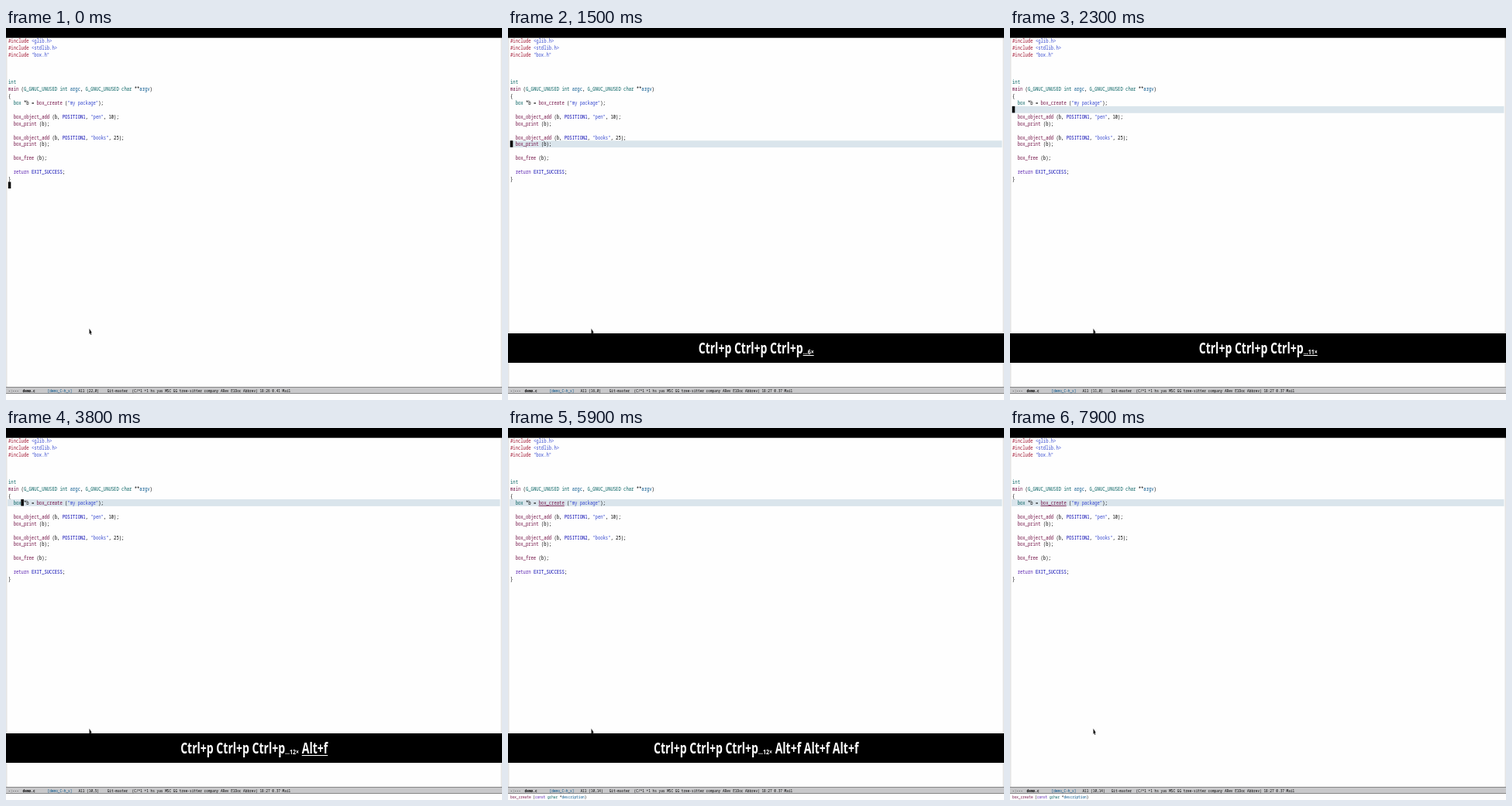
Animation of 640x480 px, one loop 8 s. Source, as an HTML page with a canvas:

```html
<!DOCTYPE html>
<html lang="en">
<head>
<meta charset="utf-8">
<title>Editor demo</title>
<style>
  html, body { margin: 0; width: 100%; height: 100%; overflow: hidden; background: #000; }
  canvas { display: block; }
</style>
</head>
<body>
<canvas id="stage" width="640" height="480"></canvas>
<script>
const ctx = document.getElementById('stage').getContext('2d');

const LOOP = 8000;
const SQUASH = 0.75;              // a 16:9 screen shown at 4:3
const LEFT = 3, TOP = 12.1, ROW = 8.88;
const CODE = { size: 7.38, step: 3.32 };
const SMALL = { size: 5.92, step: 2.66 };
const PAPER = '#fefefe', INK = '#000', RED = '#a0132f', MAGENTA = '#721045',
      TEAL = '#005f5f', CYAN = '#00538b', BLUE = '#3548cf', NAVY = '#0000b0',
      PURPLE = '#5317ac', EDGE = '#e4e4e4', BAR = '#c8c8ca', BAR_EDGE = '#6a6a6a',
      HIGHLIGHT = '#dae5ec';

const code = `#include <glib.h>
#include <stdlib.h>
#include "box.h"



int
main (G_GNUC_UNUSED int argc, G_GNUC_UNUSED char **argv)
{
  box *b = box_create ("my package");

  box_object_add (b, POSITION1, "pen", 10);
  box_print (b);

  box_object_add (b, POSITION2, "books", 25);
  box_print (b);

  box_free (b);

  return EXIT_SUCCESS;
}`.split('\n');

const syntax = [
  [/^#include$/, RED],
  [/^["<]/, BLUE],
  [/^(G_GNUC_UNUSED|int|char|box|gchar)$/, TEAL],
  [/^(argc|argv|description)$/, CYAN],
  [/^(main|box_\w+)$/, MAGENTA],
  [/^(POSITION\d|EXIT_SUCCESS)$/, NAVY],
  [/^(return|const)$/, PURPLE],
];

// When each key shows in the overlay, and when the cursor follows.
const keyTimes = [200, 1000, 1100, 1300, 1400, 1500, 1700, 1800, 1900, 2100, 2200, 2400, 3800, 3900, 4300];
const moveTimes = [300, 1000, 1100, 1300, 1400, 1500, 1700, 1800, 1900, 2100, 2200, 2500, 3800, 4000, 4400];
const UPS = 12, wordEnds = [0, 5, 8, 14];
const DOC_AT = 4900, OVERLAY_END = 6900, CLOCK_AT = 1000;

const countUntil = (times, t) => times.filter(at => at <= t).length;
const rowTop = line => TOP + (line - 1) * ROW;

function rect(x, y, w, h, color) {
  ctx.fillStyle = color;
  ctx.fillRect(x, y, w, h);
}

function squashedText(str, x, y, font, color) {
  ctx.save();
  ctx.translate(x, y);
  ctx.scale(SQUASH, 1);
  ctx.font = font;
  ctx.fillStyle = color;
  ctx.fillText(str, 0, 0);
  ctx.restore();
}

function mono(str, col, y, face, color, weight = 'normal') {
  const font = `${weight} ${face.size}px "Noto Sans Mono", monospace`;
  squashedText(str, LEFT + col * face.step, y, font, color);
}

function colorOf(word) {
  const rule = syntax.find(([pattern]) => pattern.test(word));
  return rule ? rule[1] : INK;
}

function highlighted(str, y, face) {
  for (const m of str.matchAll(/"[^"]*"|<[^>]*>|#?\w+|[^\s\w"]+/g)) {
    mono(m[0], m.index, y, face, colorOf(m[0]));
  }
}

function drawCursor(line, col) {
  rect(LEFT + col * CODE.step - 0.2, rowTop(line), 3.5, ROW - 0.4, '#000');
  const char = (code[line - 1] || '')[col];
  if (char) mono(char, col, rowTop(line) + 7.1, CODE, PAPER);
}

function drawModeLine(t, line, col) {
  rect(0, 463, 640, 9, BAR);
  rect(0, 463, 640, 0.7, BAR_EDGE);
  rect(0, 471.3, 640, 0.7, BAR_EDGE);
  const y = 470.1;
  const clock = t < CLOCK_AT ? '18:26 0.41' : '18:27 0.37';
  const modes = '(C/*l +1 hs yas MSC GG tree-sitter company ARev ElDoc Abbrev)';
  mono('-:---', 0, y, SMALL, INK);
  mono('demo.c', 7, y, SMALL, INK, 'bold');
  mono('[demo_C-h_s]', 19, y, SMALL, CYAN);
  mono(`All (${line},${col})`, 34, y, SMALL, INK);
  mono('Git-master', 48, y, SMALL, INK);
  mono(`${modes} ${clock} Mail`, 60, y, SMALL, INK);
}

function drawPointer() {
  ctx.fillStyle = '#111';
  ctx.fill(new Path2D('M107.5 387.8V395L108.6 393.8L109.4 396L110.3 395.5L109.5 393.3H110.8Z'));
}

function overlayParts(keys) {
  const ups = Math.min(keys, UPS), parts = [];
  const add = (text, small) => parts.push({ text, small });
  for (let i = 0; i < Math.min(ups, 3); i++) add((i ? ' ' : '') + 'Ctrl+p');
  if (ups > 3) add(`…${ups}×`, true);
  for (let i = UPS; i < keys; i++) add(' Alt+f');
  return parts;
}

function drawOverlay(t) {
  const keys = countUntil(keyTimes, t);
  if (!keys || t >= OVERLAY_END) return;
  rect(0, 394, 640, 38, '#000');
  const parts = overlayParts(keys);
  const measure = (text, font) => {
    ctx.font = font;
    return ctx.measureText(text).width * SQUASH;
  };
  for (const p of parts) {
    p.font = `bold ${p.small ? 9.35 : 18.7}px "Noto Sans", sans-serif`;
    p.width = measure(p.text, p.font);
  }
  let x = 320.2 - parts.reduce((sum, p) => sum + p.width, 0) / 2;
  for (const p of parts) {
    squashedText(p.text, x, p.small ? 421.3 : 420, p.font, PAPER);
    p.x = x;
    x += p.width;
  }
  if (t - keyTimes[keys - 1] < 200) {
    const last = parts[parts.length - 1];
    const indent = last.text[0] === ' ' ? measure(' ', last.font) : 0;
    rect(last.x + indent, 422, last.width - indent, 1, PAPER);
  }
}

function draw(t) {
  const moves = countUntil(moveTimes, t);
  const line = 22 - Math.min(moves, UPS);
  const col = wordEnds[Math.max(0, moves - UPS)];
  const idle = t - (moves ? moveTimes[moves - 1] : 0);

  rect(0, 0, 640, 480, PAPER);
  rect(0, 12, 1.5, 451, EDGE);
  rect(638.5, 12, 1.5, 451, EDGE);
  rect(0, 0, 640, 12.7, '#000');
  if (line <= code.length) rect(2, rowTop(line), 635.5, ROW, HIGHLIGHT);

  code.forEach((text, i) => highlighted(text, rowTop(i + 1) + 7.1, CODE));
  if (t >= DOC_AT) {
    rect(LEFT + 11 * CODE.step, rowTop(10) + 8, 10 * CODE.step, 0.8, MAGENTA);
    highlighted('box_create (const gchar *description)', 478.4, SMALL);
  }
  if (Math.floor(idle / 500) % 2 === 0) drawCursor(line, col);
  drawModeLine(t, line, col);
  drawPointer();
  drawOverlay(t);
}

function tick(now) {
  draw(now % LOOP);
  requestAnimationFrame(tick);
}
draw(0);
requestAnimationFrame(tick);
</script>
</body>
</html>
```
